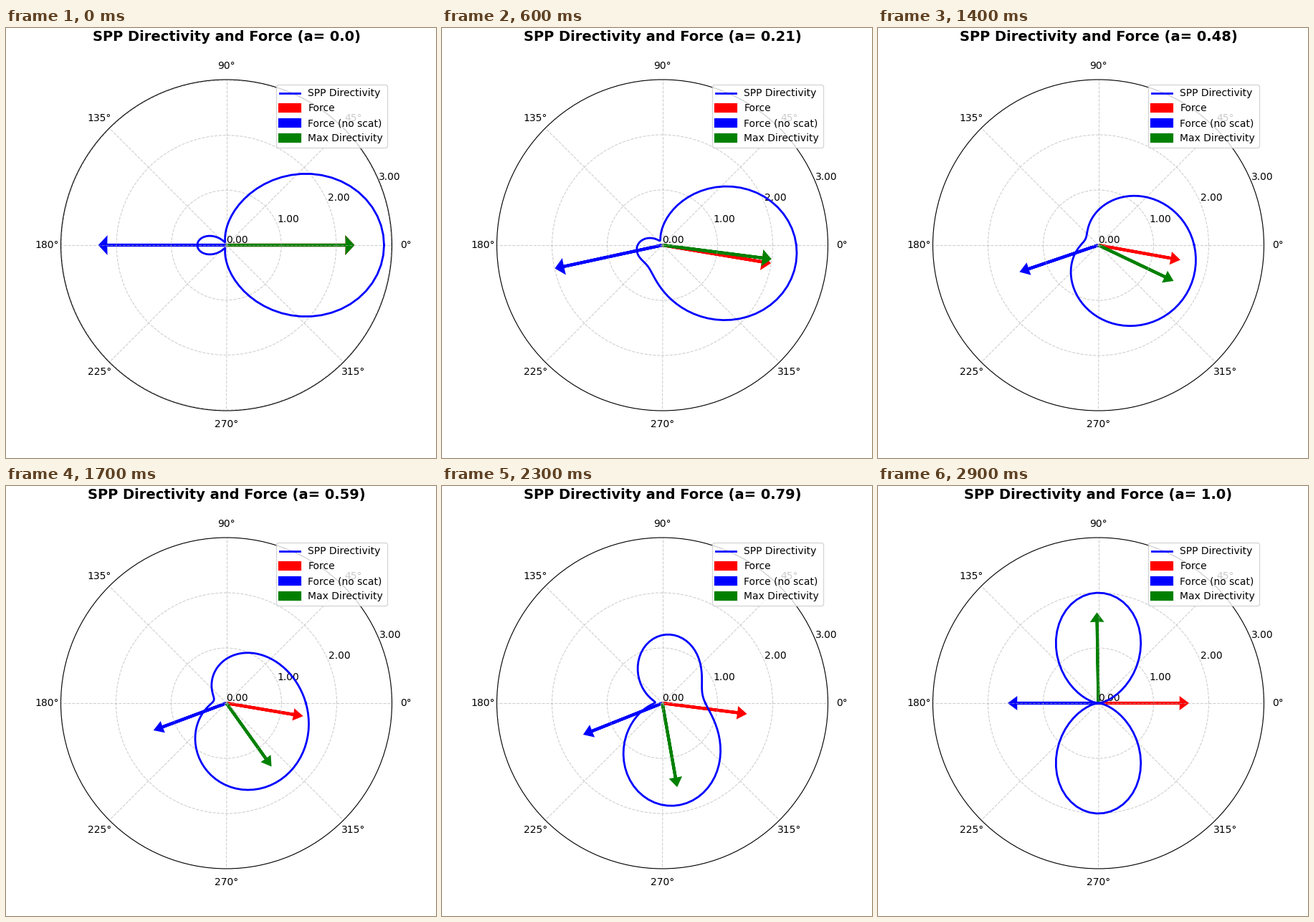
Recreate the animation shown at these times as a matplotlib script. Size 600x600 px, loop 3000 ms.

```python
import numpy as np
import matplotlib.pyplot as plt
from matplotlib.animation import FuncAnimation

FRAMES = 30
INTERVAL = 100
THETA = np.linspace(0, 2 * np.pi, 100)
RINGS = [0, 1, 2, 3]

fig = plt.figure(figsize=(6, 6), dpi=100)
ax = fig.add_subplot(projection="polar")


def directivity(a):
    """Angular SPP intensity of a dipole, scaled to a mean of one."""
    x, y = np.cos(THETA), np.sin(THETA)
    cross = np.sqrt(a * (1 - a))
    total = ((1 - a) * (0.3 + 1.17 * x + 1.4 * x**2)
             + a * 1.4 * y**2
             - cross * (0.575 * y + 0.11 * x * y))
    return total / (1 - 0.3 * a)


def force_angles(a):
    """Directions of the force with and without scattering."""
    cross = np.sqrt(a * (1 - a))
    full = -np.arctan2(cross, 2.15 + 1.3 * a)
    no_scat = np.pi + np.arctan2(cross, 2.17 - 1.45 * a)
    return full, no_scat


def draw_arrow(angle, length, color, label):
    ax.arrow(angle, 0, 0, length, head_width=0.1, head_length=0.1,
             length_includes_head=True, color=color, lw=3, label=label)


def update(i):
    a = i / (FRAMES - 1)
    d = directivity(a)
    peak = d.max()
    best = THETA[np.argmax(np.round(d, 9))]  # first of equal lobes
    full, no_scat = force_angles(a)

    ax.clear()
    ax.plot(THETA, d, color="blue", lw=2, label="SPP Directivity")
    draw_arrow(full, 0.8 * peak, "red", "Force")
    draw_arrow(no_scat, 0.8 * peak, "blue", "Force (no scat)")
    draw_arrow(best, 0.8 * peak, "green", "Max Directivity")

    ax.set_yticks(RINGS, [f"{r:.2f}" for r in RINGS])
    ax.set_xlim(0, 2 * np.pi)
    ax.set_ylim(0, max(3, 1.05 * peak))
    ax.grid(True, linestyle="--", alpha=0.6)
    ax.set_title(f"SPP Directivity and Force (a= {round(a, 2)})",
                 fontsize=14, fontweight="bold", pad=20)
    ax.legend(loc="upper right")
    return []


anim = FuncAnimation(fig, update, frames=FRAMES, interval=INTERVAL,
                     init_func=lambda: update(0), repeat=True)
plt.show()
```
